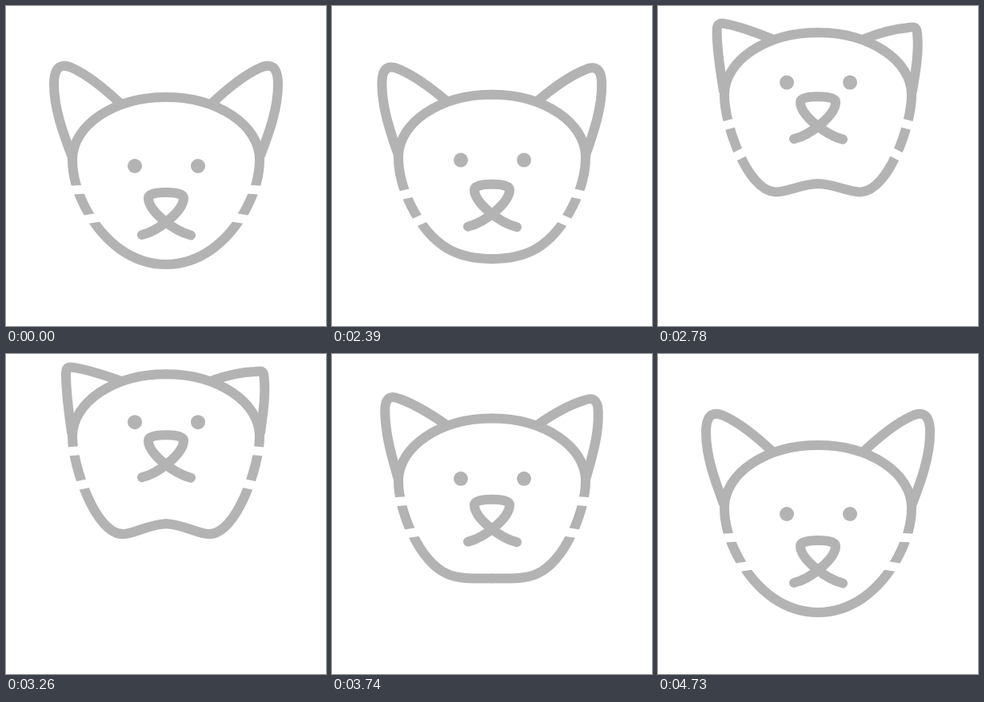
An HTML page that plays this animation: 400x400 px, repeating every 4760 ms.

```html
<!DOCTYPE html>
<html lang="en">
<head>
<meta charset="utf-8">
<title>Jumping cat</title>
<style>
  html, body { margin: 0; width: 100%; height: 100%; overflow: hidden; background: #fff; }
  svg { display: block; width: 100%; height: 100%; }
  path { fill: none; stroke: #b3b3b3; stroke-width: 12; stroke-linecap: round; stroke-linejoin: round; }
  .whisker { stroke: #fff; stroke-width: 11; stroke-linecap: butt; }
  circle { fill: #b3b3b3; }
</style>
</head>
<body>
<svg viewBox="0 0 400 400">
  <g id="cat">
    <g class="half"></g>
    <g class="half" transform="matrix(-1 0 0 1 400 0)"></g>
    <g id="eyes"><circle cx="161" cy="200" r="9"/><circle cx="240" cy="200" r="9"/></g>
    <path id="nose" d="M170 286C191 281 222 256 222 240C222 235 212 233 200 233C188 233 178 235 178 240C178 256 209 281 231 286.5"/>
  </g>
</svg>
<script>
const LOOP = 4760;
const RISE = 2030, TOP = 3080, FALL = 3185, LAND = 4235;

const $ = id => document.getElementById(id);
const shift = (el, y) => el.setAttribute('transform', `translate(0 ${y})`);

const halves = [...document.querySelectorAll('.half')].map(g => {
  const add = (cls = '') => {
    const p = document.createElementNS('http://www.w3.org/2000/svg', 'path');
    p.setAttribute('class', cls);
    return g.appendChild(p);
  };
  return { head: add(), upper: add('whisker'), lower: add('whisker'), ear: add() };
});

const part = (t, a, b) => Math.min(1, Math.max(0, (t - a) / (b - a)));
const bump = (t, a, b) => Math.sin(Math.PI * part(t, a, b));

// Cubic ease in and out
function ease(t, a, b) {
  const u = part(t, a, b);
  return u < 0.5 ? 4 * u ** 3 : 1 - 4 * (1 - u) ** 3;
}

function whisker(x, y, tilt) {
  const r = 22;
  return `M${x - r} ${y + r * tilt}L${x + r} ${y - r * tilt}`;
}

function headPath(to) {
  return `M200 114C135 114 83 149 83 192
    C83 229 ${to(106, 112)} ${to(278, 314)} ${to(144, 146)} ${to(305, 314)}
    C160 ${to(316, 314)} 180 ${to(323, 301)} 200 ${to(323, 301)}`;
}

// dx and dy move the tip alone
function earPath(to, dx, dy) {
  const tip = (x0, x1, y0, y1) => `${to(x0, x1) + dx} ${to(y0, y1) + dy}`;
  return `M82 187C${to(73, 79)} ${to(163, 165)} ${to(60, 75)} ${to(130, 140)} ${tip(60, 75, 98, 113)}
    C${tip(60, 75, 74, 104)} ${tip(70, 80, 71, 105)} ${tip(84, 86, 78, 106)}
    C105 ${to(88, 109) + dy / 2} 125 ${to(105, 116)} 142 ${to(121, 122)}`;
}

function draw(t) {
  const jump = ease(t, RISE, TOP) - ease(t, FALL, LAND);
  const crouch = bump(t, RISE, 2570) + bump(t, 3690, 4250);
  const swing = 9 * bump(t, RISE, 2780) - 20 * (ease(t, 2600, 3260) - ease(t, FALL, 4400));
  const tilt = 0.2 * bump(t, RISE, 3320);
  const to = (a, b) => a + (b - a) * jump;

  shift($('cat'), 13 * crouch - 89 * jump);
  shift($('eyes'), -26 * jump);
  shift($('nose'), -43 * jump);

  halves.forEach((h, side) => {
    h.head.setAttribute('d', headPath(to));
    h.upper.setAttribute('d', whisker(92, 229.5 + swing, 0.07 + tilt));
    h.lower.setAttribute('d', whisker(105, 266 + swing * 0.8, 0.16 + tilt * 1.8));
    h.ear.setAttribute('d', earPath(to, side * 2.5 * jump, side * 5 * jump));
  });
}

const start = performance.now();
function tick() {
  draw((performance.now() - start) % LOOP);
  requestAnimationFrame(tick);
}
tick();
</script>
</body>
</html>
```
